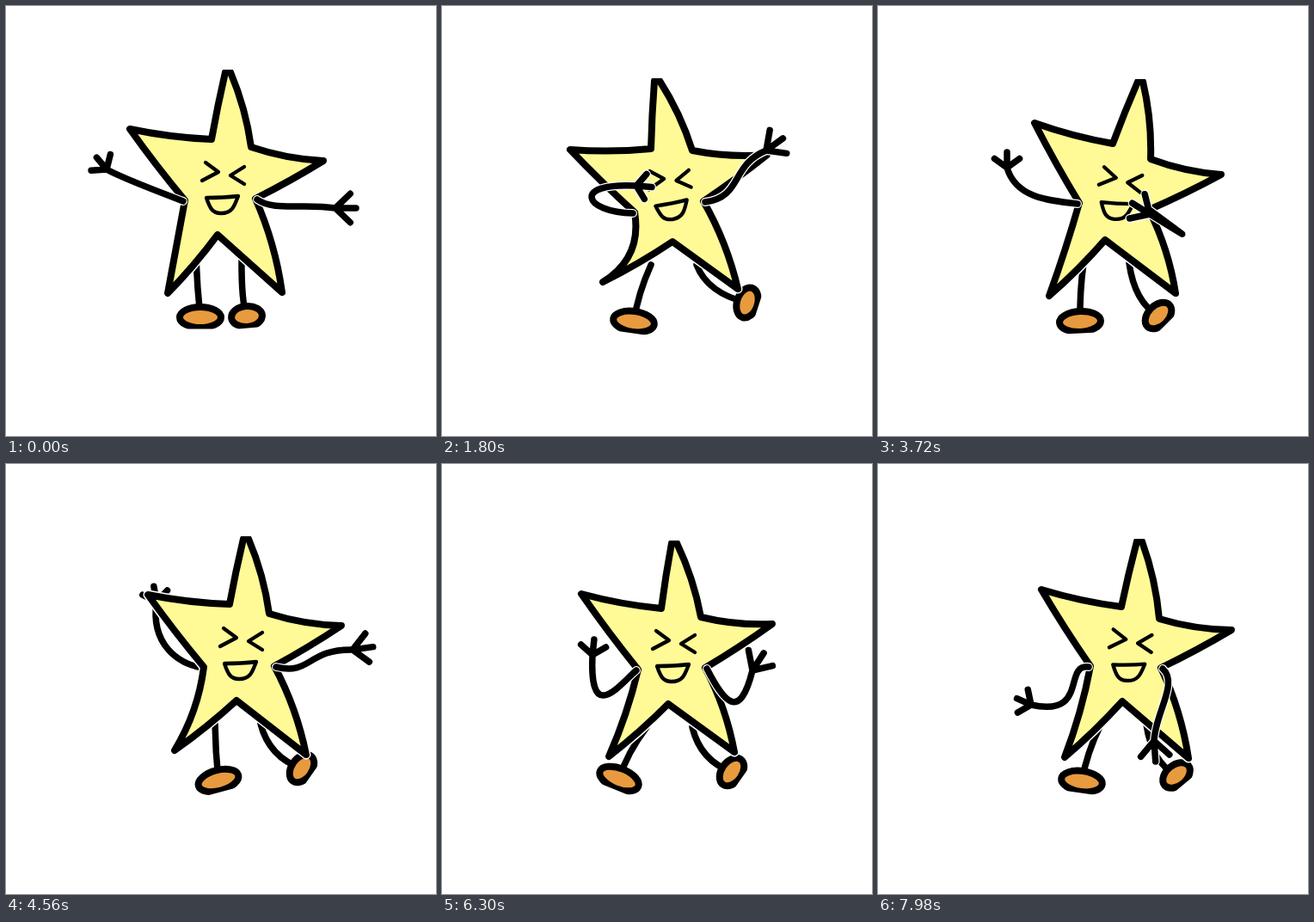
Write an HTML page with a canvas that moves like this. It is 500 px wide and 500 px high and loops after 8 s.

```html
<!DOCTYPE html>
<html lang="en">
<head>
<meta charset="utf-8">
<title>Dancing star</title>
<style>
html, body { margin: 0; width: 100%; height: 100%; overflow: hidden; background: #fff; }
canvas { display: block; width: 100vmin; height: 100vmin; }
</style>
</head>
<body>
<canvas id="stage" width="500" height="500"></canvas>
<script>
const ctx = document.getElementById('stage').getContext('2d');
const LOOP = 8000, STEP = 60;
const YELLOW = '#fffa96', ORANGE = '#e89a3e';

// Every key pose starts with its time in ms.
// top tip, right notch, right tip, left tip, left notch
const upper = [
  [0, 258, 77, 285, 164, 369, 180, 144, 143, 239, 155],
  [1800, 250, 87, 291, 168, 378, 173, 149, 167, 243, 166],
  [3720, 305, 88, 317, 178, 399, 196, 182, 136, 273, 160],
  [4560, 279, 87, 306, 174, 390, 188, 165, 152, 260, 163],
  [5580, 288, 92, 317, 180, 398, 189, 176, 158, 270, 170],
  [6300, 270, 92, 301, 178, 384, 186, 162, 151, 255, 168],
  [7980, 304, 90, 327, 180, 411, 193, 190, 146, 283, 166]
];
// right waist, right foot tip, crotch, left foot tip, left waist, left flank bend
const lower = [
  [0, 290, 224, 321, 333, 246, 266, 188, 334, 208, 226, 0],
  [1800, 304, 227, 344, 329, 268, 274, 187, 321, 224, 240, -30],
  [3720, 315, 237, 346, 334, 264, 272, 199, 337, 234, 229, -2],
  [4560, 312, 235, 349, 338, 268, 275, 196, 333, 230, 236, -11],
  [5580, 322, 237, 361, 344, 280, 280, 207, 338, 241, 242, -11],
  [6300, 306, 237, 340, 335, 263, 279, 194, 340, 228, 239, -5],
  [7980, 329, 237, 361, 342, 284, 276, 217, 341, 247, 235, -5]
];
// mouth x, y, tilt
const face = [
  [0, 251, 229, 0], [1800, 267, 236, -8], [3720, 277, 236, 6], [4560, 272, 238, 0],
  [5580, 284, 242, -1], [6300, 268, 241, 0], [7980, 291, 240, 2]
];
// two bend points, palm, hand angle
const leftArm = [
  [0, 165, 211, 135, 200, 117, 190, -130],
  [1000, 180, 222, 130, 206, 103, 192, -150],
  [1800, 165, 240, 150, 205, 226, 209, 5],
  [3720, 195, 226, 160, 222, 150, 188, -90],
  [4560, 200, 232, 168, 210, 175, 160, -100],
  [5000, 195, 240, 150, 215, 136, 180, -100],
  [5580, 185, 243, 170, 215, 202, 184, -40],
  [6300, 208, 255, 171, 306, 175, 222, -84],
  [7200, 200, 240, 170, 245, 147, 215, -130],
  [7980, 215, 232, 245, 295, 178, 280, -156]
];
const rightArm = [
  [0, 312, 239, 345, 229, 383, 235, 0],
  [1800, 350, 222, 335, 185, 377, 168, -36],
  [2550, 345, 245, 385, 215, 428, 205, -20],
  [3720, 370, 277, 362, 270, 316, 242, -148],
  [4560, 355, 246, 350, 215, 403, 216, -8],
  [5580, 372, 253, 388, 245, 383, 197, -83],
  [5950, 355, 255, 385, 250, 413, 220, -30],
  [6300, 328, 277, 346, 300, 361, 240, -57],
  [7100, 345, 250, 375, 230, 408, 216, -10],
  [7980, 350, 255, 322, 290, 321, 322, 86]
];
// left x, y, turn; right x, y, turn
const feet = [
  [0, 226, 362, 0, 280, 361, -5],
  [1800, 223, 367, 8, 355, 345, -72],
  [3720, 235, 367, -3, 326, 360, -45],
  [4560, 247, 368, -15, 344, 354, -55],
  [5580, 217, 366, 27, 363, 354, -60],
  [6300, 206, 366, 22, 337, 358, -55],
  [7980, 237, 369, 8, 347, 362, -40]
];
// beat start, height of the hop up to the next beat
const hops = [[0, 2], [900, 6], [1800, 6], [2760, 3], [3720, 8],
  [4560, 12], [5580, 20], [6300, 19], [7140, 17], [7980, 0]];

const mix = (a, b, u) => a + (b - a) * u;
const rad = degrees => degrees * Math.PI / 180;

function segment(keys, t) {
  let i = 0;
  while (i < keys.length - 2 && t >= keys[i + 1][0]) i++;
  const [a, b] = [keys[i], keys[i + 1]];
  return { a, b, u: Math.min(1, (t - a[0]) / (b[0] - a[0])) };
}

function pose(keys, t) {
  const { a, b, u } = segment(keys, t);
  const eased = (1 - Math.cos(Math.PI * u)) / 2;
  return a.slice(1).map((v, i) => mix(v, b[i + 1], eased));
}

function ink(width, color = '#000') {
  ctx.lineWidth = width;
  ctx.strokeStyle = color;
  ctx.stroke();
}

function placed(x, y, degrees, draw) {
  ctx.save();
  ctx.translate(x, y);
  ctx.rotate(rad(degrees));
  draw();
  ctx.restore();
}

function drawLeg(hipX, hipY, bendX, bendY, x, y) {
  ctx.beginPath();
  ctx.moveTo(hipX, hipY);
  ctx.quadraticCurveTo(mix(hipX, x, bendX) - 2, mix(hipY, y, bendY), x, y);
  ink(7.5);
}

function drawFoot(x, y, turn, rx) {
  placed(x, y, turn, () => {
    ctx.beginPath();
    ctx.rect(-40, -40, 80, 53.5);
    ctx.clip();
    ctx.beginPath();
    ctx.ellipse(0, 0, rx, 12, 0, 0, Math.PI * 2);
    ctx.fillStyle = ORANGE;
    ctx.fill();
    ink(8);
  });
}

function drawArm(shoulderX, shoulderY, [ax, ay, bx, by, x, y, angle], reach, spread) {
  ctx.beginPath();
  ctx.moveTo(shoulderX, shoulderY);
  ctx.bezierCurveTo(ax, ay, bx, by, x, y);
  for (const side of [-1, 0, 1]) {
    const direction = rad(angle + side * spread);
    ctx.moveTo(x, y);
    ctx.lineTo(x + reach * Math.cos(direction), y + reach * Math.sin(direction));
  }
  ink(10, '#fff');
  ink(7.5);
}

function drawStar(up, low) {
  const [tx, ty] = up;
  const points = [[tx + 3, ty]];
  const add = (list, from, to) => {
    for (let i = from; i < to; i += 2) points.push([list[i], list[i + 1]]);
  };
  add(up, 2, 6);
  add(low, 0, 10);
  add(up, 6, 10);
  points.push([tx - 3, ty]);
  const bulges = [6, -6, 2, 8, 0, 3, low[10], 2, -4, 1, 0];

  ctx.save();
  ctx.beginPath();
  ctx.rect(0, ty - 3, 500, 500);
  ctx.clip();
  ctx.beginPath();
  ctx.moveTo(...points[0]);
  points.forEach(([x, y], i) => {
    const [nx, ny] = points[(i + 1) % points.length];
    const length = Math.hypot(nx - x, ny - y), k = bulges[i] / length;
    ctx.quadraticCurveTo((x + nx) / 2 + (ny - y) * k, (y + ny) / 2 - (nx - x) * k, nx, ny);
  });
  ctx.closePath();
  ink(11, '#fff');
  ctx.fillStyle = YELLOW;
  ctx.fill();
  ink(8);
  ctx.restore();
}

function drawFace([x, y, tilt]) {
  placed(x, y, tilt, () => {
    ctx.beginPath();
    ctx.moveTo(-19, -47);
    ctx.lineTo(-4, -36);
    ctx.lineTo(-23, -26);
    ctx.moveTo(26, -42);
    ctx.lineTo(10, -32);
    ctx.lineTo(26, -22);
    ctx.moveTo(-18, -6);
    ctx.quadraticCurveTo(2, -6, 19, -8);
    ctx.bezierCurveTo(15, 2, 13, 12, -1, 12);
    ctx.bezierCurveTo(-11, 12, -14, 6, -18, -6);
    ctx.closePath();
    ink(4.3);
  });
}

function draw(t) {
  const hop = segment(hops, t);
  const lift = Math.sin(Math.PI * hop.u) ** 2;
  const rise = hop.a[1] * lift;
  const up = pose(upper, t), low = pose(lower, t);
  const [rightX, rightY, , , crotchX, crotchY, , , leftX, leftY] = low;

  // Feet gather under the body at the height of each hop.
  const together = [crotchX - 20, 362, 0, crotchX + 34, 361, -5];
  const [lx, ly, lTurn, rx, ry, rTurn] =
    pose(feet, t).map((v, i) => mix(v, together[i], lift));

  ctx.fillStyle = '#fff';
  ctx.fillRect(0, 0, 500, 500);
  ctx.lineCap = ctx.lineJoin = 'round';

  const hipY = crotchY + 27 - rise;
  drawLeg(crotchX - 25, hipY, 0.65, 0.5, lx, ly);
  drawLeg(crotchX + 28, hipY, 0.25, 0.75, rx, ry);
  drawFoot(lx, ly, lTurn, 24);
  drawFoot(rx, ry, rTurn, 18);

  ctx.save();
  ctx.translate(0, -rise);
  const drawLeftArm = () => drawArm(leftX - 2, leftY + 1, pose(leftArm, t), 18, 54);
  const armBehind = t > 4140 && t < 5070;
  if (armBehind) drawLeftArm();
  drawStar(up, low);
  drawFace(pose(face, t));
  if (!armBehind) drawLeftArm();
  drawArm(rightX + 2, rightY + 1, pose(rightArm, t), 24, 44);
  ctx.restore();
}

const start = performance.now();
function tick() {
  const t = (performance.now() - start) % LOOP;
  draw(Math.floor(t / STEP) * STEP);
  requestAnimationFrame(tick);
}
tick();
</script>
</body>
</html>
```
